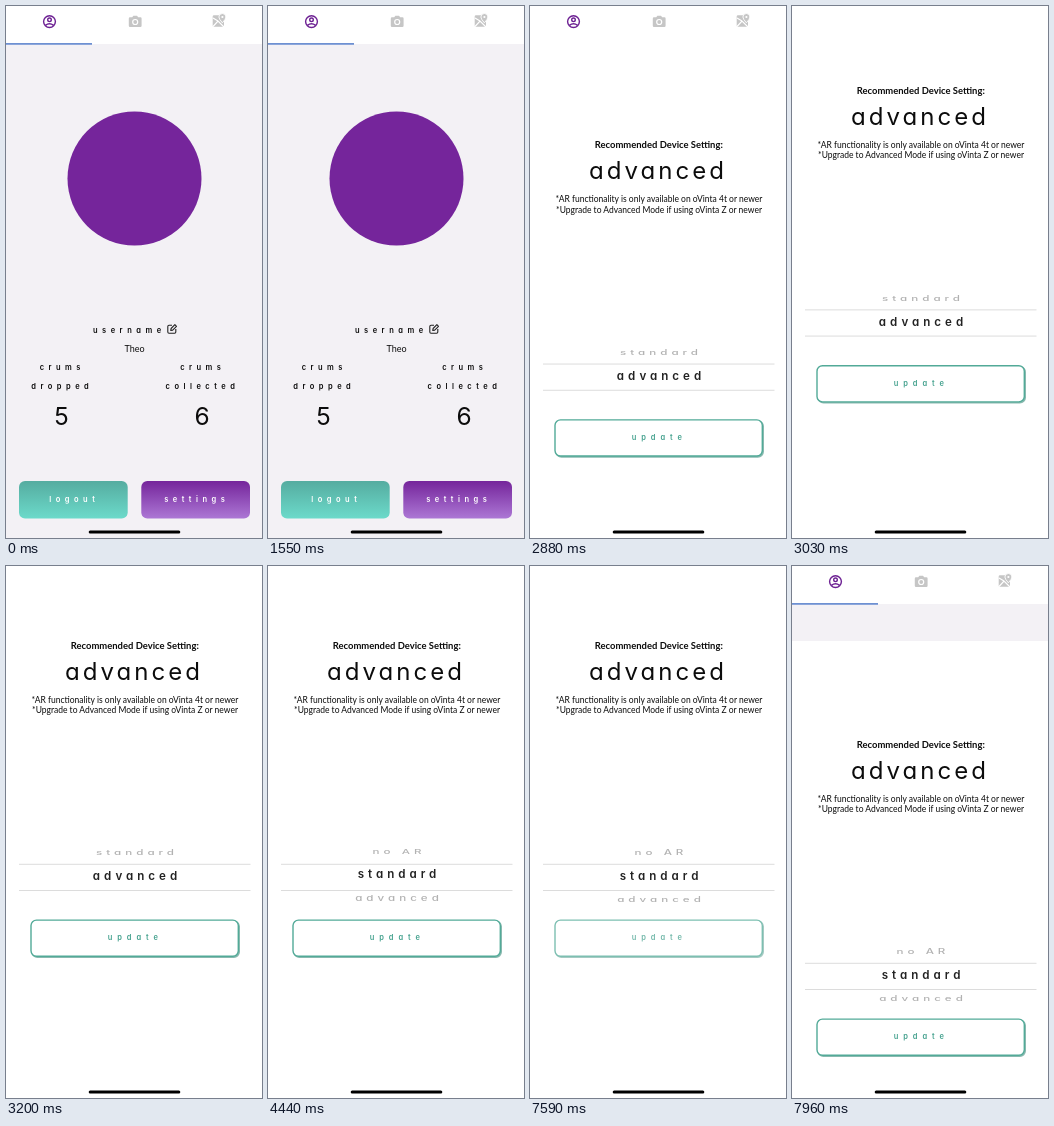
Write an HTML page that moves like this. It is 256 px wide and 532 px high and loops after 8 s.

```html
<!DOCTYPE html>
<html lang="en">
<head>
<meta charset="utf-8">
<title>Profile and device settings</title>
<style>
  html, body { margin: 0; width: 100%; height: 100%; overflow: hidden; background: #fff; }
  svg { display: block; width: 100vw; height: 100vh; }
  text { text-anchor: middle; font-family: Lato, sans-serif; fill: #0c0c0c; white-space: pre; }
  .spaced, .wheel text, .big { font-family: Inter, sans-serif; font-feature-settings: "cv11"; }
  .spaced { font-size: 7.5px; font-weight: 600; letter-spacing: 4.5px; }
  .big { font-size: 24px; letter-spacing: 3px; }
  .count { font: 24.5px Inter, sans-serif; }
  .wheel text { font-size: 11.6px; letter-spacing: 4px; font-weight: 600; fill: #222; }
  .wheel.side text { font-weight: 500; fill: #000; opacity: .3; }
  .light { fill: #fff; }
  .note { font-size: 8.5px; }
  #update rect { filter: drop-shadow(1.6px 1.8px .7px #3a8a7a99); }
</style>
</head>
<body>
<svg viewBox="0 0 256 532" preserveAspectRatio="none">
  <defs>
    <linearGradient id="teal" x2="0" y2="1">
      <stop stop-color="#55aca0"/><stop offset="1" stop-color="#6cdaca"/>
    </linearGradient>
    <linearGradient id="purple" x2="0" y2="1">
      <stop stop-color="#75259b"/><stop offset="1" stop-color="#ac77d5"/>
    </linearGradient>
    <clipPath id="band"><path d="M0 298.5H256V324H0Z"/></clipPath>
    <clipPath id="edges"><path d="M0 282.5H256V298H0ZM0 324.5H256V338H0Z"/></clipPath>
  </defs>

  <rect width="256" height="532" fill="#f3f1f5"/>
  <rect width="256" height="38" fill="#fff"/>
  <rect y="37.2" width="86" height="1.4" fill="#4a76c8"/>

  <g fill="none" stroke="#6d2193" stroke-width="1.4">
    <circle cx="43.5" cy="15.6" r="5.9"/>
    <circle cx="43.5" cy="13.8" r="1.8"/>
    <path d="M39.4 19.4Q43.5 16.2 47.6 19.4"/>
  </g>
  <g fill="#c6c6c6">
    <path d="M124 11.3h2.2l1.2-1.5h3.6l1.2 1.5h2.2q1.2 0 1.2 1.2v7.3q0 1.2-1.2 1.2H124q-1.2 0-1.2-1.2v-7.3q0-1.2 1.2-1.2Z"/>
    <circle cx="129.2" cy="16" r="2.5" stroke="#fff" stroke-width="1.2"/>
    <path d="M208 9.2h10v11.6h-10q-1.3 0-1.3-1.3v-9q0-1.3 1.3-1.3Z"/>
    <path d="M207 20.5l5-5.5 6 6M207 12l5 3" fill="none" stroke="#fff" stroke-width="1.2"/>
    <path d="M216.4 16.8Q212.9 13 212.9 11a3.5 3.5 0 0 1 7 0Q219.9 13 216.4 16.8Z" stroke="#fff" stroke-width=".9"/>
    <circle cx="216.4" cy="11" r="1.1" fill="#fff"/>
  </g>

  <circle cx="128.5" cy="172.5" r="67" fill="#75259b"/>

  <text class="spaced" x="123.3" y="327">username</text>
  <g fill="none" stroke="#222" stroke-width="1.1" stroke-linejoin="round">
    <path d="M166 319.3h-3q-1.2 0-1.2 1.2v5.6q0 1.2 1.2 1.2h5.6q1.2 0 1.2-1.2v-3"/>
    <path d="M164.7 324.5l.4-2 3.8-3.8 1.6 1.6-3.8 3.8Z"/>
  </g>
  <text x="128.5" y="346" font-size="9">Theo</text>
  <text class="spaced" x="56.3" y="364">crums</text>
  <text class="spaced" x="56.3" y="383">dropped</text>
  <text class="count" x="55.5" y="419">5</text>
  <text class="spaced" x="196.8" y="364">crums</text>
  <text class="spaced" x="196.5" y="383">collected</text>
  <text class="count" x="196" y="419">6</text>

  <rect x="13" y="475" width="108.7" height="37.5" rx="6" fill="url(#teal)"/>
  <text class="spaced light" x="68.3" y="496">logout</text>
  <g id="settings">
    <rect x="135.3" y="475" width="108.7" height="37.5" rx="6" fill="url(#purple)"/>
    <text class="spaced light" x="190.8" y="496">settings</text>
  </g>

  <g id="modal">
    <rect y="-24" width="256" height="640" fill="#fff"/>
    <text x="128.8" y="82.5" font-size="9.45" font-weight="700">Recommended Device Setting:</text>
    <text class="big" x="128" y="113.5">advanced</text>
    <text class="note" x="129" y="136.5">*AR functionality is only available on oVinta 4t or newer</text>
    <text class="note" x="129" y="146.8">*Upgrade to Advanced Mode if using oVinta Z or newer</text>
    <path d="M13 298.3H244.5M13 324.5H244.5" stroke="#dcdcdc"/>
    <g clip-path="url(#edges)"><g class="wheel side"></g></g>
    <g clip-path="url(#band)"><g class="wheel"></g></g>
    <g id="update">
      <rect x="25" y="354.1" width="207.3" height="36.2" rx="5.5" fill="#fff" stroke="#52aa98" stroke-width="1.4"/>
      <text class="spaced" x="129.3" y="374.3" style="fill:#46a28f;letter-spacing:4.9px">update</text>
    </g>
  </g>

  <rect x="82.7" y="524.4" width="91.6" height="3" rx="1.5"/>
</svg>
<script>
const LOOP = 8000, RADIUS = 30, STEP = 0.9;
const options = ['no AR', 'standard', 'advanced'];
const $ = id => document.getElementById(id);
const clamp = v => Math.max(0, Math.min(1, v));

const wheels = [...document.querySelectorAll('.wheel')].map(g => options.map(label => {
  const el = document.createElementNS('http://www.w3.org/2000/svg', 'text');
  el.textContent = label;
  return g.appendChild(el);
}));

// Remaining distance (1 to 0) of a critically damped spring.
function spring(t, start, rate) {
  const x = Math.max(0, t - start) / 1000 * rate;
  return (1 + x) * Math.exp(-x);
}

function modalOffset(t) {
  if (t >= 7960) return 99;
  return t >= 3200 ? 0 : 556 * spring(t, 2680, 18.9);
}

function turnWheel(pos) {
  for (const items of wheels) items.forEach((el, i) => {
    const angle = (i - pos) * STEP;
    const y = 310.3 + RADIUS * Math.sin(angle);
    el.setAttribute('transform', `translate(131 ${y}) scale(1 ${Math.max(0.01, Math.cos(angle))})`);
    el.setAttribute('y', 4);
    el.style.display = Math.abs(angle) < 1.5 ? '' : 'none';
  });
}

function draw(t) {
  $('modal').setAttribute('transform', `translate(0 ${modalOffset(t)})`);
  const press = clamp((t - 2320) / 150) - clamp((t - 2470) / 230);
  $('settings').setAttribute('opacity', 1 - 0.8 * press);
  $('update').setAttribute('opacity', t >= 7590 && t < 7960 ? 0.75 : 1);
  turnWheel(t < 5130 ? 1 + spring(t, 4055, 11) : 1);
}

const begin = performance.now();
function tick() {
  draw((performance.now() - begin) % LOOP);
  requestAnimationFrame(tick);
}
tick();
</script>
</body>
</html>
```
